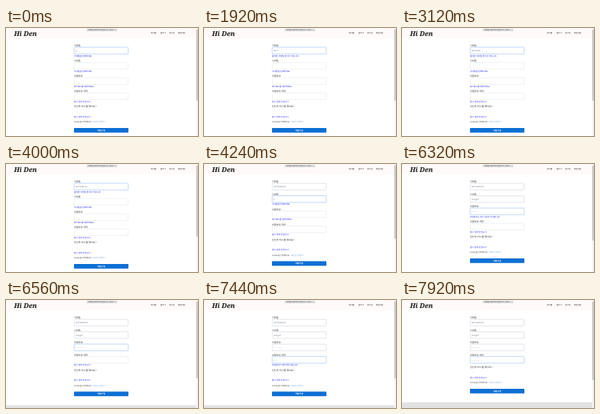
Write an HTML page that moves like this. It is 240 by 135 pixels and loops after 8 s.

```html
<!DOCTYPE html>
<html lang="ko">
<meta charset="utf-8">
<style>
  html, body { margin: 0; height: 100%; overflow: hidden; background: #fff; }
  svg { display: block; width: 100vw; height: 100vh; }
  text {
    font-family: "Noto Sans CJK KR", "Noto Sans CJK", "Noto Sans", sans-serif;
    dominant-baseline: central;
    text-rendering: geometricPrecision;
    white-space: pre;
  }
  .logo { font-family: "Noto Serif", serif; font-style: italic; font-weight: 600; }
  .secret { letter-spacing: .9px; }
</style>
<svg id="stage" viewBox="0 0 240 135"></svg>
<script>
const LOOP = 8000;
const BLUE = '#2424f4';
const stage = document.getElementById('stage');

const rect = (x, y, w, h, fill, extra = '') =>
  `<rect x="${x}" y="${y}" width="${w}" height="${h}" fill="${fill}" ${extra}/>`;
const text = (x, y, size, fill, str, extra = '') =>
  `<text x="${x}" y="${y}" font-size="${size}" fill="${fill}" ${extra}>${str}</text>`;

// keys: times at which one more character appears; errors: [end time, message]
const fields = [
  {
    label: '이메일', value: 'test7@ab.test', focus: [0, 4240],
    keys: [880, 1360, 1680, 1760, 1920, 2240, 2640, 3120, 3200, 3520, 3840, 4000, 4240],
    errors: [[880, '이메일을 입력하세요'], [4240, '올바른 이메일 형식이 아닙니다']],
  },
  {
    label: '닉네임', value: 'mango7', focus: [4240, 5520],
    keys: [4640, 4720, 4800, 5040, 5200, 5360],
    errors: [[4640, '닉네임을 입력하세요']],
  },
  {
    label: '비밀번호', value: '••••••', style: 'secret', focus: [5520, 6800],
    keys: [5760, 5920, 6080, 6240, 6320, 6560],
    errors: [[5760, '패스워드를 입력하세요'], [6560, '비밀번호는 최소 6자리 이상입니다']],
  },
  {
    label: '비밀번호 확인', value: '••••••', style: 'secret', focus: [6800, LOOP],
    keys: [7040, 7200, 7360, 7520, 7680, 7920],
    errors: [[7040, '필수 입력 칸입니다'], [7920, '비밀번호가 일치하지 않습니다']],
  },
];

function drawField(field, y, t) {
  const focused = t >= field.focus[0] && t < field.focus[1];
  const typed = field.value.slice(0, field.keys.filter(k => k <= t).length);
  const error = field.errors.find(([end]) => t < end);
  const border = focused ? '#9cc3f6' : typed ? '#c6ccd8' : '#dfe3e8';
  let out = text(85, y, 3, '#333', field.label);
  if (focused) out += rect(85.1, y + 2, 67.8, 8.6, 'none', 'rx=".8" stroke="#e2edfc" stroke-width=".9"');
  out += rect(85.3, y + 2.2, 67.4, 8.2, '#fff', `rx=".6" stroke="${border}" stroke-width=".5"`);
  out += text(87, y + 6.4, 2.4, '#666b78', typed, `class="${field.style || ''}"`);
  if (focused && !typed) out += rect(87, y + 5, 0.25, 3, '#555');
  if (error) out += text(85, y + 12.8, 2.6, BLUE, error[1]);
  return [out, error ? 19 : 15.5];
}

function drawHeader() {
  const nav = [[181, '마이홈'], [193, '글쓰기'], [204, '로그인'], [215, '회원가입']];
  return rect(0, 0, 240, 13.2, '#fffaf8') +
    rect(101, 0.8, 38, 3.2, '#d9d9db', 'rx=".5"') +
    text(103, 2.4, 2.3, '#555', '화면을 공유하고 있습니다 · 중지') +
    text(10, 7.2, 8.4, '#111', 'Hi Den', 'class="logo"') +
    nav.map(([x, label]) => text(x, 6.3, 2.4, '#111', label, 'font-weight="500"')).join('');
}

function render(now) {
  const t = now % LOOP;
  let out = drawHeader();
  let y = 22;
  for (const field of fields) {
    const [markup, height] = drawField(field, y, t);
    out += markup;
    y += height;
  }
  out += text(85, y, 3, '#333', '당신의 박스를 했어요?') +
    text(88, y + 5.5, 2.4, '#666', '-') +
    text(85, y + 12.7, 2.6, BLUE, '필수 입력 칸입니다') +
    text(85, y + 19.2, 2.4, '#333', 'Hi Den을 선택했나요?') +
    text(109, y + 19.2, 2.3, '#6d9fe8', '정리된 선택하기') +
    rect(85, y + 26.9, 68, 5.8, '#0d6fd4', 'rx=".6"') +
    text(119, y + 29.8, 2.6, '#fff', '회원가입', 'text-anchor="middle" font-weight="600"');

  // The page gets shorter as errors clear: the footer rises and the scroll thumb grows.
  out += rect(0, y + 44, 240, 20, '#e2e2e2') +
    rect(237.6, 0, 2.4, 135, '#f3f3f3') +
    rect(237.9, 2, 1.8, 89 + (98 - y) * 0.65, '#c1c1c1');
  stage.innerHTML = out;
}

function tick() {
  render(performance.now());
  requestAnimationFrame(tick);
}
tick();
</script>
</html>
```
